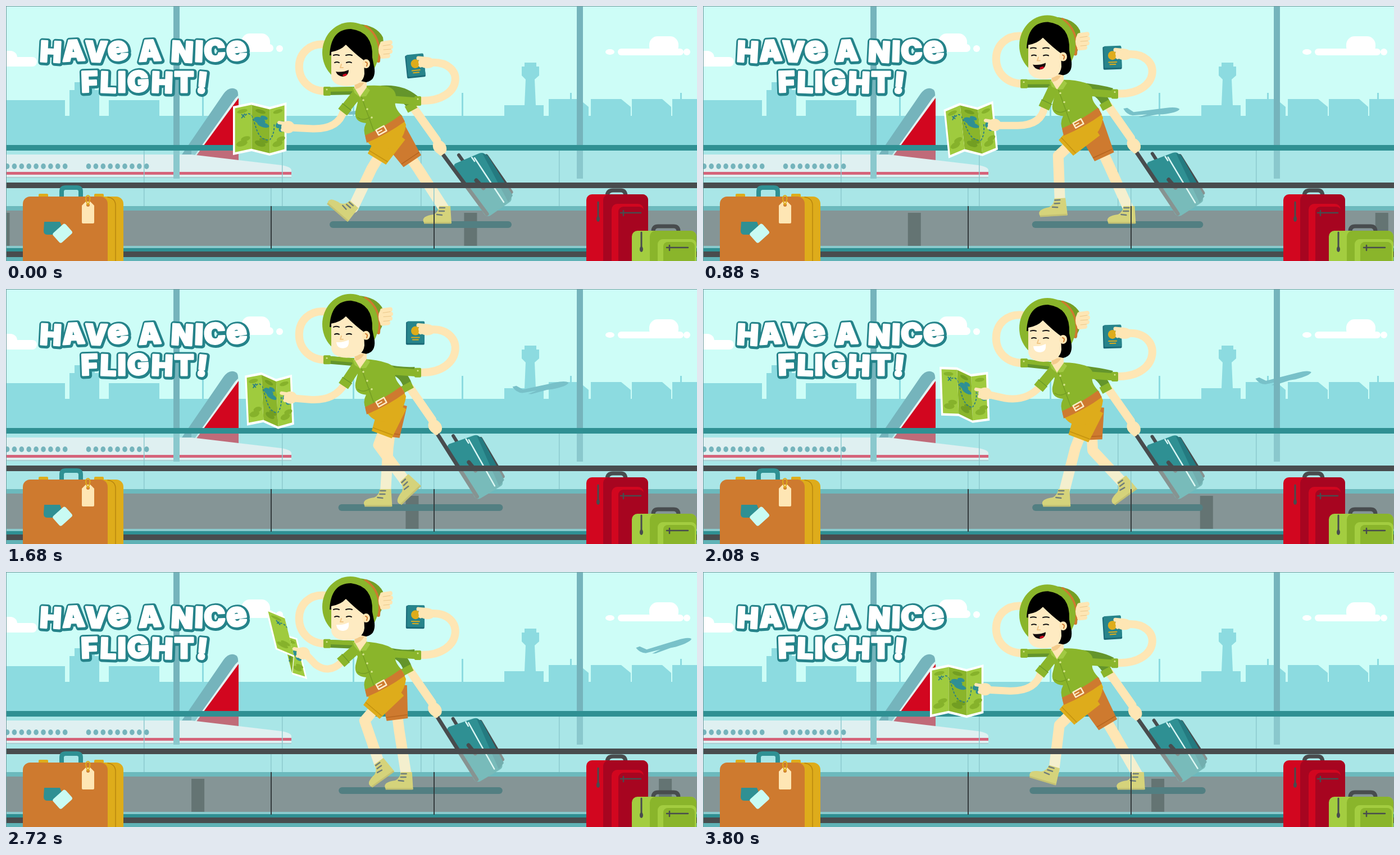
Recreate the animation shown at these times as an HTML page with a canvas. Size 1230 by 455 pixels, loop 3840 ms.

```html
<!DOCTYPE html>
<html lang="en">
<head>
<meta charset="utf-8">
<title>Have a nice flight</title>
<style>
  html, body { margin: 0; width: 1230px; height: 455px; overflow: hidden; background: #cdfdf7; }
  canvas, svg { position: absolute; left: 0; top: 0; }
  text { font: 900 51px Inter, "Open Sans", sans-serif; letter-spacing: 3px; text-anchor: middle; stroke-linejoin: round; }
  .rim { fill: #25838a; stroke: #25838a; stroke-width: 11px; }
  .face { fill: #fff; stroke: #fff; stroke-width: 3px; }
  .e { font-size: 61px; }
</style>
</head>
<body>
<canvas id="stage" width="1230" height="455"></canvas>
<svg width="1230" height="455">
  <defs>
    <g id="title">
      <text x="247" y="99" rotate="3 -3 2">HAV<tspan class="e" rotate="-8">e</tspan><tspan rotate="0 -3 0 3 2 -3"> A NIC</tspan><tspan class="e" rotate="-8">e</tspan></text>
      <text x="247" y="154" rotate="-2 2 0 -3 2 0 6">FLIGHT!</text>
    </g>
  </defs>
  <use href="#title" class="rim" x="1" y="1"/>
  <use href="#title" class="face"/>
</svg>
<script>
const LOOP = 3840, STEP = 480, W = 1230, H = 455;
const SKIN = '#fee6b4', LIME = '#8ab52b', MOSS = '#64952b', GOLD = '#deac1b', RUST = '#ce7a2f',
      TEAL = '#2f9093', DARK = '#484c4e', RED = '#d2061f', HAZE = '#8cdbe0', STEEL = '#75b4bc';

const layer = () => Object.assign(document.createElement('canvas'), { width: W, height: H });
const out = document.getElementById('stage').getContext('2d');
const backdrop = layer(), actor = layer(), luggage = layer();
let g;

// ---- drawing helpers
const fill = (c, d) => { g.fillStyle = c; g.fill(new Path2D(d)); };
const line = (c, w, d, cap = 'round') => {
  g.strokeStyle = c; g.lineWidth = w; g.lineCap = cap; g.lineJoin = 'round';
  g.stroke(new Path2D(d));
};
const rect = (c, x, y, w, h, r = 0) => {
  g.fillStyle = c; g.beginPath(); g.roundRect(x, y, w, h, r); g.fill();
};
const oval = (c, x, y, rx, ry = rx, a = 0) => {
  g.fillStyle = c; g.beginPath(); g.ellipse(x, y, rx, ry, a, 0, 7); g.fill();
};
const at = (x, y, deg, draw) => {
  g.save(); g.translate(x, y); g.rotate(deg * Math.PI / 180); draw(); g.restore();
};

// Smooth monotone interpolation through periodic rows of [time, ...values]
function key(rows, t, period) {
  const n = rows.length;
  let i = rows.findLastIndex(r => r[0] <= t);
  const row = k => {
    const lap = Math.floor(k / n);
    return rows[k - lap * n].map((v, j) => j ? v : v + lap * period);
  };
  const [a, b, c, d] = [i - 1, i, i + 1, i + 2].map(row);
  const span = c[0] - b[0], s = (t - b[0]) / span;
  const slope = (p, q, j) => (q[j] - p[j]) / (q[0] - p[0]);
  const blend = (u, v) => u * v > 0 ? 2 * u * v / (u + v) : 0;
  return b.slice(1).map((v, k) => {
    const j = k + 1, m = slope(b, c, j);
    const m0 = blend(slope(a, b, j), m) * span, m1 = blend(m, slope(c, d, j)) * span;
    const s2 = s * s, s3 = s2 * s;
    return (2 * s3 - 3 * s2 + 1) * v + (s3 - 2 * s2 + s) * m0 + (3 * s2 - 2 * s3) * c[j] + (s3 - s2) * m1;
  });
}

// ---- motion: body lift and arm lift per step, then leg phase: ankle x, y, foot angle, knee bend
const BOB = [[0, 0, 0], [40, 1, -2], [160, -13, -22], [290, -22, -30], [320, -21, -27], [440, -7, -8]];
const LEG = [
  [0, 618, 356, 41, 3], [.06, 598, 360, 0, 6], [.167, 642, 360, 0, 4], [.292, 692, 360, 0, 2],
  [.5, 781, 360, 0, 0], [.58, 780, 351, -20, 12], [.667, 747, 341, -36, 27],
  [.792, 691, 339, -45, 40], [.833, 666, 340, -36, 40], [.958, 625, 350, 16, 26]];
// cuff, elbow, hand
const closeArm = [598, 181, 575, 204, 527, 166], restArm = [601, 187, 592, 220, 500, 216];
const ARM = [
  [0, ...restArm], [480, 609, 192, 606, 226, 520, 226], [1240, 606, 192, 598, 223, 512, 222],
  [2080, 599, 188, 575, 214, 500, 200], [2400, ...closeArm], [3300, ...closeArm],
  [3560, 597, 187, 560, 218, 450, 208], [3780, ...restArm]];
// four points of the top edge, then the side vector
const closeMap = [462, 86, 495, 100, 492, 131, 518, 139, 18, 73];
const restMap = [404, 179, 437, 172, 469, 180, 499, 172, 0, 87];
const MAP = [
  [0, ...restMap], [480, 424, 202, 457, 189, 490, 195, 519, 183, 11, 83],
  [1240, 430, 189, 457, 179, 486, 190, 512, 180, 6, 90],
  [2080, 421, 152, 452, 153, 477, 165, 507, 161, 3, 87],
  [2400, ...closeMap], [3300, ...closeMap],
  [3560, 351, 167, 385, 161, 418, 170, 450, 164, 3, 87], [3780, ...restMap]];

function paintBackdrop() {
  g = backdrop.getContext('2d');
  rect('#cdfdf7', 0, 0, W, 200);
  // clouds
  const cloud = '#fff';
  rect(cloud, -20, 91, 75, 17, 8); rect(cloud, -20, 80, 40, 26, 12);
  rect(cloud, 400, 68, 76, 14, 7); rect(cloud, 419, 49, 51, 33, 15); oval(cloud, 487, 76, 6);
  rect(cloud, 1089, 76, 117, 12, 6); rect(cloud, 1145, 54, 52, 33, 15);
  oval(cloud, 1075, 82, 8, 5); oval(cloud, 1212, 82, 6);
  // skyline
  fill(HAZE, 'M0 168H105V196H113V150H122V136H158V150H166V196H183V168H273V196H887V177H923L925 131L918 124V108H923V101H944V108H949V124L941 131L943 177H957V196H966V166H1020L1037 180V196H1041V166H1095L1112 180V196H1114V166H1168L1184 180V196H1186V166H1230V250H0Z');
  for (const [x, y] of [[350, 150], [618, 150], [812, 155], [1005, 155], [1201, 155]]) rect(HAZE, x - 1, y, 3, 50);
  rect('#a9e6e7', 0, 250, W, 108);
}

function paintJet(t) {
  const x = 645 + .165 * t + 1.05e-5 * t * t, y = 188 - .042 * Math.max(0, t - 1380);
  at(x, y, -12 * Math.min(1, Math.max(0, (t - 500) / 2000)), () =>
    fill('#78c1c9', 'M-50 -7L-43 -8L-32 0L25 -5Q45 -7 50 -2Q46 4 20 6L10 6L-18 10L-24 9L-8 5L-34 6Q-45 4 -50 -7Z'));
}

function paintHall(t) {
  // parked airliner
  fill(STEEL, 'M322 252L387 157Q398 142 410 149Q414 152 413 163L338 268H311Z');
  fill('#e4f4f4', 'M408 165L413 160V276L335 268Z');
  fill(RED, 'M414 164V276L338 268Z');
  fill('rgba(169,230,231,.45)', 'M330 258H414V277L330 268Z');
  fill('#dff0f1', 'M0 265H330L490 284Q508 287 508 293V307H0Z');
  rect('#d5637a', 0, 296, 508, 5); rect('#a8cfd3', 0, 305, 508, 2);
  for (let i = 0; i < 9; i++) for (const x of [2, 147]) oval(STEEL, x + i * 12.9, 286, 4.3, 5);
  // window frames and rail
  for (const x of [298, 1016]) { rect(STEEL, x, 0, 11, 250); rect('#8ac8cd', x, 250, 11, 58); }
  for (const x of [245, 491, 738, 984]) rect('#8cc9ce', x, 258, 1.5, 99);
  rect(TEAL, 0, 248, W, 10);
  // walkway
  rect('#6cb9bd', 0, 357, W, 8);
  rect('#859596', 0, 365, W, 64);
  for (let i = -2; i < 2; i++) rect('#647473', i * 832 + 815 + t * 1664 / LOOP, 369, 23, 59);
  rect('#8acacd', 0, 428, W, 5); rect(TEAL, 0, 432, W, 6);
  rect(DARK, 0, 438, W, 10); rect('#5fb2b6', 0, 448, W, 7);
}

function paintLeg(p, lift, cloth, hem) {
  const [ax, ay, turn, bend] = key(LEG, p % 1, 1), hx = 690, hy = 226 + lift;
  const dx = ax - hx, dy = ay - hy, len = Math.hypot(dx, dy);
  const kx = (hx + ax) / 2 - dy / len * bend, ky = (hy + ay) / 2 + dx / len * bend;
  line(SKIN, 19, `M${hx} ${hy}L${kx} ${ky}L${ax} ${ay + 4}`);
  at(ax, ay, turn, () => {
    fill('#cbb82a', 'M-10 -3H10L12 28H-36Q-41 22 -36 17Q-30 13 -20 12Q-11 8 -10 -3Z');
    line('#ad9a1c', 3, 'M-37 27H11', 'butt');
    line('#20282a', 2.5, 'M-9 0H0M-10 6H-1M-14 12L-5 13');
  });
  const tx = kx - hx, ty = ky - hy, l = Math.hypot(tx, ty), nx = -ty / l, ny = tx / l;
  const spot = (s, w) => `${hx + tx * s + nx * w} ${hy + ty * s + ny * w}`;
  fill(cloth, `M${spot(-.1, 26)}L${spot(.75, 20)}L${spot(.75, -18)}L${spot(0, -24)}Z`);
  line(hem, 1.5, `M${spot(.67, 20)}L${spot(.67, -18)}`, 'butt');
}

function paintTrolley(u) {
  at(773 - 10 * u, 257 - 7 * u, 4.5 * u, () => {
    g.translate(-773, -257);
    line(DARK, 6, 'M806 266L816 280M772 257L856 370');
    line(DARK, 7, 'M855 268L899 332');
    fill(TEAL, 'M800 281L842 263Q850 260 854 266L899 340Q902 347 895 351L862 374Q855 377 851 371L798 288Q796 284 800 281Z');
    fill('#247a80', 'M848 263L857 266L902 338L894 350Z');
    line('#d9f6f4', 2.5, 'M829 270L834 277M834 271L886 350');
    line(DARK, 7, 'M772 257L856 371');
    line(DARK, 7, 'M837 311L850 325');
  });
}

function paintMap(m) {
  const base = g.getTransform(), vx = m[8], vy = m[9];
  for (const i of [2, 1, 0]) {
    const [x, y, x2, y2] = m.slice(i * 2);
    const unit = () => g.transform(x2 - x, y2 - y, vx, vy, x, y);
    unit();
    rect('#fff', 0, 0, 1.01, 1);
    const l = i ? 0 : .11, r = i === 2 ? .89 : 1.01;
    rect(i === 1 ? LIME : '#9fcb3e', l, .05, r - l, .9);
    const patch = i === 1 ? '#729e22' : '#86b22b';
    oval(patch, .5, .14, .28, .04); oval(patch, .48, .8, .3, .06); oval(patch, .68, .72, .25, .05);
    if (i === 1) { oval(TEAL, .45, .33, .32, .07); oval(TEAL, .65, .4, .33, .05); oval(TEAL, .7, .25, .2, .04); }
    if (i === 2) { oval(TEAL, .62, .42, .26, .07); oval(TEAL, .75, .52, .2, .06); }
    g.beginPath();
    if (i === 0) { g.moveTo(.65, .24); g.quadraticCurveTo(.85, .18, 1, .27); }
    if (i === 1) { g.moveTo(0, .27); g.bezierCurveTo(.3, .45, .25, .75, 1, .68); }
    if (i === 2) { g.moveTo(0, .68); g.quadraticCurveTo(.3, .6, .28, .38); }
    g.setTransform(base);
    g.strokeStyle = '#2a7d86'; g.lineWidth = 1.8; g.lineCap = 'butt';
    g.setLineDash([4, 2.5]); g.stroke(); g.setLineDash([]);
    if (!i) {
      g.beginPath(); unit();
      g.moveTo(.46, .2); g.lineTo(.64, .28); g.moveTo(.64, .2); g.lineTo(.46, .28);
      g.setTransform(base); g.stroke();
    }
  }
}

function paintHead(grin) {
  // hat
  fill('#759f24', 'M625 32Q660 34 671 56Q677 94 650 108Z');
  line(RUST, 6, 'M640 37Q668 56 663 98');
  oval(LIME, 613, 83, 50, 54);
  // hair, face
  fill('#000', 'M576 88Q578 41 614 41Q654 46 652 92L656 112Q658 133 641 136L632 134L628 90Z');
  fill('#feebc2', 'M579 82Q596 79 605 69Q622 86 637 97L638 121Q636 142 606 143Q581 142 579 126Z');
  oval(SKIN, 641, 103, 7, 8);
  line(RUST, 2, 'M640 100Q645 101 642 107');
  line('#111', 2, 'M583 88Q588 86 593 88M605 88Q611 86 616 88M585 101Q589 99 593 101M606 101Q611 99 615 101');
  line('#f1c685', 2, 'M597 104L595 110H600');
  if (grin) fill('#fff', 'M588 115Q600 116 610 111Q612 125 600 126Q589 126 588 115Z');
  else {
    fill('#140b0c', 'M587 117Q599 119 610 114Q610 125 599 126Q590 125 587 117Z');
    oval(RED, 603, 123, 4, 2, -.3);
  }
}

function paintTraveller(t) {
  const [lift, swing] = key(BOB, t % STEP, STEP), u = Math.max(0, -lift / 22), p = t / (2 * STEP);
  const shift = (dy, draw) => at(0, dy, 0, draw);
  const sag = 12 * u, back = lift + sag;   // the shoulder lags behind the rising body
  g = actor.getContext('2d');
  g.clearRect(0, 0, W, H);

  paintTrolley(u);
  // arm pulling the trolley
  const hx = 771 - 9 * u, hy = 250 - 7 * u, cx = 722 - 7 * u, cy = 181 - 6 * u;
  line(SKIN, 15, `M${cx + 3} ${cy}L${hx - 4} ${hy - 10}`);
  oval(SKIN, hx + 1, hy + 2, 14, 11, .9);
  line(SKIN, 8, `M${hx - 6} ${hy + 4}L${hx + 3} ${hy + 13}`);
  line(MOSS, 16, `M682 ${154 + back}Q706 ${155 + back} ${cx} ${cy - 2}`, 'butt');
  line(LIME, 19, `M${cx - 4} ${cy - 6}L${cx + 2} ${cy + 5}`, 'butt');

  // arm with the passport
  line(SKIN, 14, `M738 ${169 + lift}C816 ${171 + lift} 818 ${97 + swing} 756 ${101 + swing}`);
  line(MOSS, 14, `M668 ${149 + back}Q705 ${146 + back + sag} 728 ${166 + lift}`, 'butt');
  line(LIME, 13, `M678 ${166 + lift}L732 ${170 + lift}`, 'butt');
  rect(LIME, 727, 161 + lift, 12, 17, 2);
  oval('#d6e58e', 733, 166 + lift, 1.5);
  shift(swing, () => {
    at(728, 107, -6 + 7 * u, () => {
      rect('#1b6a78', -16, -20, 33, 41, 2); rect('#27848b', -14, -21, 31, 39, 2);
      oval(GOLD, 1, -4, 8); line(GOLD, 2, 'M-6 8H8M-4 12H6');
    });
    oval(SKIN, 749, 101, 15, 10, .1);
    line(SKIN, 7, 'M745 94L734 93M744 101L738 106');
  });

  // arm holding the hat
  const wrist = 152 + swing * .9, armpit = 151 + lift;
  line(SKIN, 14, `M572 ${69 + swing}C506 ${60 + swing} 504 ${wrist + 2} 572 ${wrist}`);
  line(MOSS, 14, `M572 ${wrist}L625 ${armpit}`, 'butt');
  line(LIME, 8, `M572 ${wrist - 3}L625 ${armpit - 3}`, 'butt');
  rect(LIME, 565, wrist - 8, 13, 16, 2);
  oval('#d6e58e', 571, wrist - 3, 1.5);

  paintLeg(p + .5, lift, RUST, '#b5651f');
  paintLeg(p, lift, GOLD, '#c4920f');

  shift(lift, () => {
    // shorts, shirt, belt
    fill(GOLD, 'M640 236Q650 257 674 257Q708 246 712 212L706 198Z');
    fill(LIME, `M614 147Q650 ${138 + sag / 3} 680 ${144 + sag * .8}Q698 ${150 + sag} 693 172Q691 182 706 197L641 235Q634 222 641 209Q619 207 622 188L626 172Z`);
    line('#759f24', 1.5, 'M632 160Q641 185 655 224M626 199Q636 206 648 198');
    fill(RUST, 'M639 231Q675 215 703 194L710 206Q680 228 642 244Z');
    at(668, 222, -29, () => {
      g.strokeStyle = '#fdeec9'; g.lineWidth = 2.5; g.strokeRect(-8, -5, 16, 10);
      line('#fdeec9', 2, 'M-7 0H1');
    });
    for (const [x, y] of [[636, 168], [643, 184], [651, 199]]) oval('#d6e58e', x, y, 1.8);
    fill(SKIN, 'M620 130H642V147L630 163L620 147Z');
    fill('#f4cc8d', 'M620 138L638 136Q632 147 622 148Z');
    fill('#a1c943', 'M617 145L621 147L630 162L622 160ZM642 145L648 150L641 161L630 162Z');
    paintHead(t >= 1680 && t < 3500);
  });
  shift(swing, () => {
    oval(SKIN, 672, 78, 9, 15);
    line(SKIN, 8, 'M670 67L684 65M670 75L685 73M671 82L684 81M670 90L680 89');
    line('#eac78a', 1, 'M671 71L684 69M672 78L685 77M672 86L683 85');
  });

  // arm with the map
  shift(lift, () => {
    const [ax, ay, ex, ey, x, y] = key(ARM, t, LOOP);
    paintMap(key(MAP, t, LOOP));
    line(SKIN, 13, `M${ax} ${ay}Q${ex} ${ey} ${(ex + x) / 2} ${(ey + y) / 2 + 1}L${x + 6} ${y + 1}`);
    oval(SKIN, x + 2, y, 12, 11);
    line(SKIN, 6, `M${x - 2} ${y - 6}L${x - 14} ${y - 8}`);
    line(SKIN, 6, `M${x - 2} ${y + 5}L${x - 8} ${y + 5}`);
    line(LIME, 18, `M624 158L${ax} ${ay}`, 'butt');
    const d = Math.hypot(624 - ax, 158 - ay), dx = (624 - ax) / d, dy = (158 - ay) / d;
    line(LIME, 20, `M${ax + dx * 9} ${ay + dy * 9}L${ax - dx * 3} ${ay - dy * 3}`, 'butt');
    line(MOSS, 1.2, `M${ax + dx * 9 - dy * 10} ${ay + dy * 9 + dx * 10}L${ax + dx * 9 + dy * 10} ${ay + dy * 9 - dx * 10}`);
  });

  // pane in front of the lower part
  g.globalCompositeOperation = 'source-atop';
  rect('rgba(231,252,245,.4)', 0, 320, W, 140);
  g.globalCompositeOperation = 'source-over';
  return u;
}

function paintLuggage() {
  g = luggage.getContext('2d');
  rect(DARK, 0, 315, W, 10);
  for (const x of [471, 761]) { rect('#343b3d', x, 357, 2, 76); rect('#8cc9ce', x, 325, 1.5, 32); }
  // orange case
  rect(GOLD, 120, 340, 89, 130, 13);
  line('#b9860f', 1.5, 'M181 341Q195 343 195 356V455');
  rect(GOLD, 58, 335, 17, 8, 2); rect(GOLD, 157, 335, 17, 8, 2);
  line(TEAL, 8, 'M99 343V331Q99 324 106 324H126Q133 324 133 331V343', 'butt');
  rect(RUST, 30, 340, 151, 130, 13);
  at(85, 397, 0, () => fill(TEAL, 'M-17 -12H11L20 11H-12Q-18 11 -18 4Z'));
  at(101, 406, -42, () => rect('#c9fbf3', -15, -12, 30, 23, 4));
  fill(SKIN, 'M135 356L142 349H150L157 356V386Q157 388 155 388H137Q135 388 135 386Z');
  oval(RUST, 146, 355, 3); line(GOLD, 2, 'M146 355Q138 340 146 338Q153 340 146 355');
  // red case
  line(DARK, 7, 'M1070 340Q1070 329 1080 329H1095Q1103 329 1103 340', 'butt');
  rect(RED, 1033, 336, 110, 134, 10);
  rect('#a70520', 1063, 336, 80, 134, 10);
  rect(RED, 1078, 353, 57, 117, 10); rect('#a70520', 1090, 358, 46, 112, 9);
  line(DARK, 2.5, 'M1094 369H1130M1099 365V374'); line(DARK, 3, 'M1054 350V378');
  oval(DARK, 1054, 380, 3, 5);
  // green bag
  line(DARK, 7, 'M1152 402Q1152 393 1161 393H1188Q1197 393 1197 402', 'butt');
  rect('#a3cd40', 1114, 401, 115, 70, 10);
  rect(LIME, 1146, 401, 83, 70, 10);
  rect('#a3cd40', 1160, 416, 69, 55, 9); rect(LIME, 1170, 421, 56, 50, 8);
  line(DARK, 2.5, 'M1176 431H1214M1181 427V436'); line(DARK, 3, 'M1131 404V434');
  oval(DARK, 1131, 434, 3, 5);
  // edge of the picture
  rect('#6f9c9e', 0, 0, W, 1); rect('#6f9c9e', 0, 0, 1, H);
}

function frame(now) {
  const t = now % LOOP, u = paintTraveller(t);
  g = out;
  g.drawImage(backdrop, 0, 0);
  paintJet(t);
  paintHall(t);
  rect('#527f82', 576 + 17 * u, 384, 324 - 34 * u, 12, 6);
  g.drawImage(actor, 0, 0);
  g.drawImage(luggage, 0, 0);
}

paintBackdrop();
paintLuggage();
const start = performance.now();
requestAnimationFrame(function tick(now) {
  frame(Math.max(0, now - start));
  requestAnimationFrame(tick);
});
</script>
</body>
</html>
```
